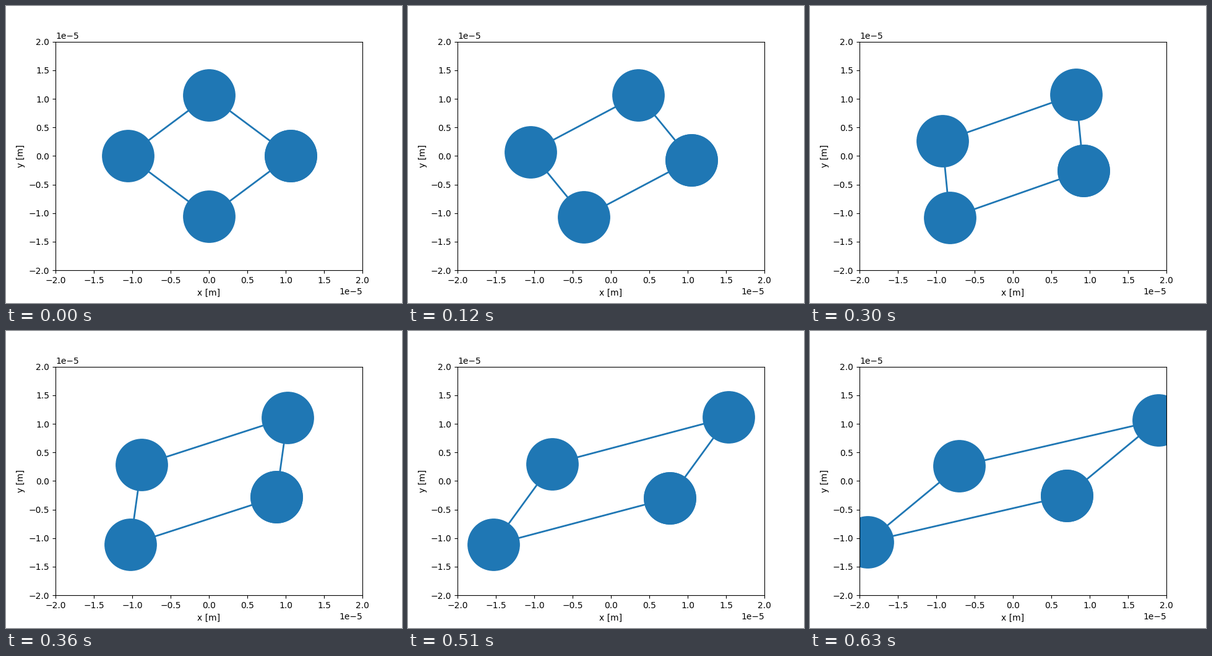
A matplotlib script that plays this animation: 640 px wide and 480 px high, repeating every 0.66 s.

```python
import numpy as np
import matplotlib.pyplot as plt
from matplotlib.animation import FuncAnimation

FRAMES = 22
INTERVAL = 30
UNIT = 1e-5
PX_X, PX_Y = 124.0, 92.4  # pixels per unit on each axis

# Offsets from the centre in pixels; opposite beads mirror each other.
KEYS = np.array([0, 4, 8, 12, 15, 17, 21], float)
TOP_X = [0, 43.9, 79, 127, 165, 190, 235]
TOP_Y = [98, 98.6, 97.5, 102.4, 103.4, 103, 98.4]
RIGHT_X = [131.5, 130, 119, 109, 100, 95, 87]
RIGHT_Y = [0, -6.6, -20.5, -26, -27.6, -27.6, -24]


def smooth(values, t):
    """Cubic Hermite curve through the key values."""
    v = np.asarray(values, float)
    slope = np.gradient(v, KEYS, edge_order=2)
    i = min(np.searchsorted(KEYS, t, side="right") - 1, len(KEYS) - 2)
    h = KEYS[i + 1] - KEYS[i]
    s = (t - KEYS[i]) / h
    return ((1 + 2 * s) * (1 - s) ** 2 * v[i]
            + s * (1 - s) ** 2 * h * slope[i]
            + s * s * (3 - 2 * s) * v[i + 1]
            + s * s * (s - 1) * h * slope[i + 1])


def ring(t):
    """Closed loop of beads: right, top, left, bottom, right."""
    right = np.array([smooth(RIGHT_X, t) / PX_X, smooth(RIGHT_Y, t) / PX_Y])
    top = np.array([smooth(TOP_X, t) / PX_X, smooth(TOP_Y, t) / PX_Y])
    return UNIT * np.array([right, top, -right, -top, right]).T


fig, ax = plt.subplots(figsize=(6.4, 4.8), dpi=100)
ax.set_xlim(-2 * UNIT, 2 * UNIT)
ax.set_ylim(-2 * UNIT, 2 * UNIT)
ax.set_xlabel("x [m]")
ax.set_ylabel("y [m]")
beads, = ax.plot(*ring(0), "o-", color="#1f77b4", lw=2, markersize=60)


def update(frame):
    beads.set_data(*ring(frame))
    return beads,


anim = FuncAnimation(fig, update, frames=FRAMES, interval=INTERVAL,
                     repeat=True, repeat_delay=0, blit=False)
plt.show()
```
